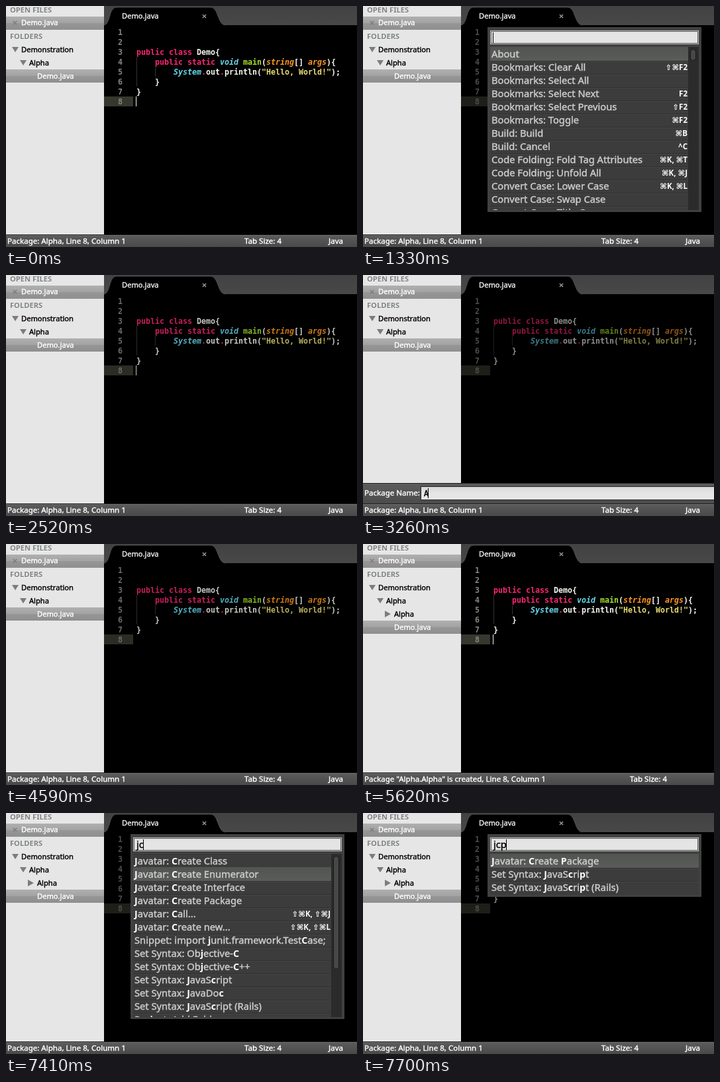
Write an HTML page with a canvas that moves like this. It is 530x365 px and loops after 8000 ms.

```html
<!DOCTYPE html>
<html lang="en">
<head>
<meta charset="utf-8">
<title>Editor command palette</title>
<style>
  html, body { margin: 0; width: 530px; height: 365px; overflow: hidden; background: #000; }
  canvas { display: block; }
</style>
</head>
<body>
<canvas id="stage" width="530" height="365"></canvas>
<script>
const ctx = document.getElementById('stage').getContext('2d');
const LOOP = 8000;
const SANS = '"Noto Sans", "DejaVu Sans", sans-serif';
const UI = `11.15px ${SANS}`, UI_BOLD = `bold 11.15px ${SANS}`, STATUS = `11.55px ${SANS}`;
const LIST = `14.7px ${SANS}`, LIST_BOLD = `bold 14.2px ${SANS}`;
const KEYS = `bold 11.5px ${SANS}`;
const MONO = '11.63px "DejaVu Sans Mono", monospace';

const PINK = '#f92672', CYAN = '#66d9ef', GREEN = '#a6e22e',
      ORANGE = '#fd971f', YELLOW = '#e6db74', WHITE = '#f8f8f2';
const COL = 7, LINE = 15, CODE_X = 197;

// Per line: number, column, then coloured runs; a third item marks italics.
const CODE = [
  [3, 0, ['public class ', PINK], ['Demo{', WHITE]],
  [4, 4, ['public static ', PINK], ['void ', CYAN, 1], ['main', GREEN], ['(', WHITE],
         ['string', ORANGE, 1], ['[] ', WHITE], ['args', ORANGE, 1], ['){', WHITE]],
  [5, 8, ['System', CYAN, 1], ['.', PINK], ['out', WHITE], ['.', PINK], ['println(', WHITE],
         ['"Hello, World!"', YELLOW], [');', WHITE]],
  [6, 4, ['}', WHITE]],
  [7, 0, ['}', WHITE]],
];

// Asterisks enclose matched letters; a bar precedes the key binding.
const RESULTS = {
  '': { selected: 0, thumb: 17, rows: [
    'About', 'Bookmarks: Clear All|⇧⌘F2', 'Bookmarks: Select All', 'Bookmarks: Select Next|F2',
    'Bookmarks: Select Previous|⇧F2', 'Bookmarks: Toggle|⌘F2', 'Build: Build|⌘B',
    'Build: Cancel|^C', 'Code Folding: Fold Tag Attributes|⌘K, ⌘T',
    'Code Folding: Unfold All|⌘K, ⌘J', 'Convert Case: Lower Case|⌘K, ⌘L',
    'Convert Case: Swap Case', 'Convert Case: Title Case'] },
  j: { selected: 1, thumb: 92, rows: [
    '*J*avatar: Create Class', '*J*avatar: Create Enumerator', '*J*avatar: Create Interface',
    '*J*avatar: Create Package', '*J*avatar: Call...|⇧⌘K, ⇧⌘J', '*J*avatar: Create new...|⇧⌘K, ⇧⌘L',
    'Snippet: import *j*unit.framework.TestCase;', 'Set Syntax: *J*ava', 'Set Syntax: *J*avaScript',
    'Set Syntax: *J*avaDoc', 'Set Syntax: *J*SON', 'Set Syntax: Ob*j*ective-C',
    'Pro*j*ect: Add Folder'] },
  jc: { selected: 1, thumb: 171, rows: [
    '*J*avatar: *C*reate Class', '*J*avatar: *C*reate Enumerator', '*J*avatar: *C*reate Interface',
    '*J*avatar: *C*reate Package', '*J*avatar: *C*all...|⇧⌘K, ⇧⌘J', '*J*avatar: *C*reate new...|⇧⌘K, ⇧⌘L',
    'Snippet: import *j*unit.framework.Test*C*ase;', 'Set Syntax: Ob*j*ective-*C*',
    'Set Syntax: Ob*j*ective-*C*++', 'Set Syntax: *J*avaS*c*ript', 'Set Syntax: *J*avaDo*c*',
    'Set Syntax: *J*avaS*c*ript (Rails)', 'Pro*j*e*c*t: Add Folder'] },
  jcp: { selected: 0, thumb: 0, rows: [
    '*J*avatar: *C*reate *P*ackage', 'Set Syntax: *J*avaS*c*ri*p*t',
    'Set Syntax: *J*avaS*c*ri*p*t (Rails)'] },
};

// Tracks alternate start time and value; null means hidden.
const TRACKS = {
  caret:   [0, 1, 140, 0, 740, 1, 1040, 0, 2520, 1, 2670, 0, 4740, 1, 4880, .5, 5030, 0,
            5470, .5, 5620, 1, 5920, .5, 6070, 0],
  dim:     [0, 0, 1040, .2, 1190, .35, 1330, .43, 2520, .2, 2670, .35, 2820, .43,
            4590, .2, 4740, 0, 6520, .25, 6670, .43],
  query:   [0, null, 1040, '', 1630, 'j', 1930, 'jc', 2220, 'jcp', 2520, null,
            6520, '', 7110, 'j', 7410, 'jc', 7700, 'jcp'],
  name:    [0, null, 2670, '', 3260, 'A', 3550, 'Al', 3850, 'Alp', 4000, 'Alph',
            4140, 'Alpha', 4590, null],
  created: [0, false, 4880, true, 6520, false],
  nested:  [0, false, 4880, true],
};

function valueAt(track, time) {
  let i = track.length - 2;
  while (track[i] > time) i -= 2;
  return track[i + 1];
}

function box(x, y, w, h, fill) {
  ctx.fillStyle = fill;
  ctx.fillRect(x, y, w, h);
}

function gradient(y, h, ...colors) {
  const g = ctx.createLinearGradient(0, y, 0, y + h);
  colors.forEach((c, i) => g.addColorStop(i / (colors.length - 1), c));
  return g;
}

// Regular faces get a hairline outline for heavier, smoothed type.
// Returns the x position after the text.
function text(str, x, y, font, color, align = 'left') {
  ctx.font = font;
  ctx.textAlign = align;
  ctx.fillStyle = ctx.strokeStyle = color;
  ctx.fillText(str, x, y);
  if (!font.includes('bold')) {
    ctx.lineWidth = .4;
    ctx.strokeText(str, x, y);
  }
  return x + ctx.measureText(str).width;
}

function triangle(x, y, open) {
  const pts = open ? [[0, 0], [10, 0], [5, 8]] : [[1, -1], [10, 4], [1, 9]];
  ctx.fillStyle = '#7c7c7c';
  ctx.beginPath();
  pts.forEach(([dx, dy]) => ctx.lineTo(x + dx, y + dy));
  ctx.fill();
}

function cross(x, y, r, color) {
  ctx.strokeStyle = color;
  ctx.lineWidth = 1.4;
  ctx.beginPath();
  ctx.moveTo(x - r, y - r); ctx.lineTo(x + r, y + r);
  ctx.moveTo(x + r, y - r); ctx.lineTo(x - r, y + r);
  ctx.stroke();
}

function heading(str, y) {
  text(str, 6, y + 1, UI_BOLD, '#f8f8f8');
  text(str, 6, y, UI_BOLD, '#7f8384');
}

function selectedRow(y) {
  box(0, y, 148, 10, gradient(y, 10, '#b0b0b0', '#a2a2a2'));
  box(0, y + 10, 148, 10, gradient(y + 10, 10, '#969696', '#8f8f8f'));
}

function drawSidebar(nested) {
  box(0, 0, 148, 346, '#e6e6e6');
  heading('OPEN FILES', 10);
  selectedRow(16);
  cross(13.5, 25.5, 2.8, '#7d7d7d');
  text('Demo.java', 23, 29, UI, '#fff');
  heading('FOLDERS', 50);
  triangle(9, 62, true);
  text('Demonstration', 23, 70, UI, '#000');
  triangle(21, 82, true);
  text('Alpha', 35, 90, UI, '#000');
  if (nested) {
    triangle(32, 102, false);
    text('Alpha', 47, 110, UI, '#000');
  }
  const y = nested ? 116 : 96;
  selectedRow(y);
  text('Demo.java', 47, y + 14, UI, '#fff');
}

function drawTab() {
  box(148, 0, 382, 29, gradient(0, 29, '#424242', '#484848'));
  ctx.beginPath();
  ctx.moveTo(148, 29);
  ctx.bezierCurveTo(158, 28, 155, 2, 167, 2);
  ctx.lineTo(309, 2);
  ctx.bezierCurveTo(321, 2, 319, 28, 331, 29);
  ctx.fillStyle = '#000';
  ctx.fill();
  ctx.strokeStyle = '#585858';
  ctx.lineWidth = .7;
  ctx.stroke();
  text('Demo.java', 175, 19, UI, '#f0f0f0');
  cross(299.5, 15.5, 2.6, '#999');
}

function drawGuide(x, top, bottom) {
  for (let y = top; y < bottom; y += 2) box(x, y, 1, 1, '#666');
}

function drawEditor(dim, caret) {
  box(148, 28, 382, 318, '#000');
  box(148, 137, 44, LINE, '#36372e');
  for (let n = 1; n <= 8; n++) {
    text(n, 176, 29 + n * LINE, 'bold ' + MONO, '#85867f', 'right');
  }
  drawGuide(CODE_X, 78, 122);
  drawGuide(CODE_X + 4 * COL, 93, 107);
  for (const [line, column, ...runs] of CODE) {
    let x = CODE_X + column * COL;
    for (const [str, color, italic] of runs) {
      text(str, x, 29 + line * LINE, (italic ? 'italic ' : '') + 'bold ' + MONO, color);
      x += str.length * COL;
    }
  }
  box(196, 137, 1, LINE, `rgba(248,248,240,${caret})`);
  box(148, 28, 382, 318, `rgba(0,0,0,${dim})`);
}

function drawRow(row, y) {
  const [label, keys] = row.split('|');
  let x = 194;
  label.split('*').forEach((part, i) => {
    x = text(part, x, y + 15, i % 2 ? LIST_BOLD : LIST, i % 2 ? '#fff' : '#cfcfcf');
  });
  if (keys) text(keys, 490, y + 14, KEYS, '#fff', 'right');
}

function drawPalette(query) {
  const { selected, thumb, rows } = RESULTS[query];
  const height = Math.min(rows.length * 20 + 2, 247);
  const width = thumb ? 299 : 315;
  box(188, 32, 323, height + 33, '#414141');
  box(192, 37, 315, 21, '#c4c4c4');
  box(193, 38, 313, 19, '#555');
  box(194, 39, 311, 17, '#e4e4e4');
  const end = text(query, 197, 53, LIST, '#000');
  box(Math.round(end) - 1, 40, 1, 16, '#000');

  ctx.save();
  ctx.beginPath();
  ctx.rect(192, 62, 315, height);
  ctx.clip();
  box(192, 62, 315, height, '#3c3c3c');
  rows.forEach((row, i) => {
    const y = 63 + i * 20;
    box(192, y, width, 1, '#303030');
    box(192, y + 1, width, 1, '#464646');
    if (i === selected) box(192, y - 1, width, 21, gradient(y, 20, '#535553', '#5a5c5a'));
    drawRow(row, y);
  });
  if (thumb) {
    box(491, 62, 16, height, '#2b2b2b');
    ctx.beginPath();
    ctx.roundRect(494.5, 65.5, 8, thumb, 4);
    ctx.fillStyle = '#474747';
    ctx.fill();
    ctx.strokeStyle = '#171717';
    ctx.lineWidth = 1;
    ctx.stroke();
  }
  ctx.restore();
}

function drawNamePanel(name) {
  box(0, 316, 530, 30, gradient(316, 30, '#5c5c5c', '#4b4b4b'));
  box(0, 315, 530, 1, '#222');
  text('Package Name:', 2, 334, STATUS, '#fff');
  box(87, 320, 443, 21, '#2a2a2a');
  box(88, 321, 442, 19, gradient(321, 19, '#d8d8d8', '#e6e6e6', '#e6e6e6'));
  text(name, 92, 335, MONO, '#000');
  box(91 + name.length * COL, 323, 1, 15, '#000');
}

function drawStatus(created) {
  box(0, 346, 530, 19, gradient(346, 19, '#5d5d5d', '#494949'));
  box(0, 346, 530, 1, '#1c1c1c');
  box(0, 347, 530, 1, '#707070');
  const place = created ? 'Package "Alpha.Alpha" is created' : 'Package: Alpha';
  text(place + ', Line 8, Column 1', 2, 360, STATUS, '#fff');
  text('Tab Size: 4', created ? 403 : 360, 360, STATUS, '#fff');
  if (!created) text('Java', 487, 360, STATUS, '#fff');
}

function draw() {
  const time = performance.now() % LOOP;
  const state = {};
  for (const key in TRACKS) state[key] = valueAt(TRACKS[key], time);
  drawEditor(state.dim, state.caret);
  drawTab();
  drawSidebar(state.nested);
  if (state.query !== null) drawPalette(state.query);
  if (state.name !== null) drawNamePanel(state.name);
  drawStatus(state.created);
  requestAnimationFrame(draw);
}
draw();
</script>
</body>
</html>
```
